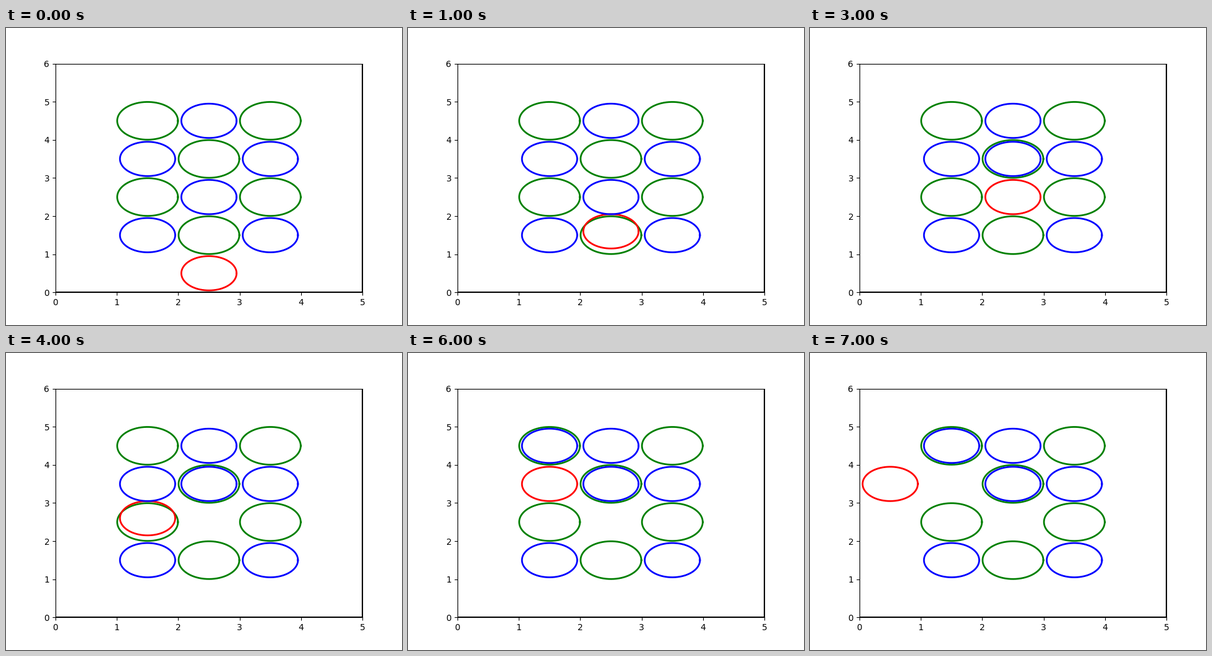
These frames come from a looping animation (640 by 480 pixels, 8 s). A matplotlib script:

```python
import numpy as np
import matplotlib.pyplot as plt
from matplotlib.animation import FuncAnimation

COLS, ROWS = 5, 6
GRAB = 0.1  # lean towards a held box
THETA = np.linspace(0, 2 * np.pi, 150)

# One entry per second: player cell and whether it holds the box above.
STEPS = [
    ((2, 0), False),
    ((2, 1), True),
    ((2, 2), True),
    ((2, 2), False),
    ((1, 2), True),
    ((1, 3), True),
    ((1, 3), False),
    ((0, 3), False),
]

CELLS = [(x, y) for y in range(1, 5) for x in range(1, 4)]
GOALS = [c for c in CELLS if sum(c) % 2]
BOXES = [c for c in CELLS if sum(c) % 2 == 0]

fig, ax = plt.subplots(figsize=(6.4, 4.8), dpi=100)
ax.set_xlim(0, COLS)
ax.set_ylim(0, ROWS)

for x in (0, COLS):
    ax.plot([x, x], [0, ROWS], color="black", lw=1.5)
for y in (0, ROWS):
    ax.plot([0, COLS], [y, y], color="black", lw=1.5)


def ring(cell, radius, lift=0.0):
    x, y = cell
    return (x + 0.5 + radius * np.cos(THETA),
            y + 0.5 + lift + radius * np.sin(THETA))


def add_ring(cell, radius, color):
    return ax.plot(*ring(cell, radius), color=color, lw=2)[0]


for goal in GOALS:
    add_ring(goal, 0.495, "green")
player = add_ring(STEPS[0][0], 0.45, "red")
boxes = [add_ring(box, 0.45, "blue") for box in BOXES]


def boxes_at(step):
    """Replay the pushes: a held box moves with the player."""
    cells = list(BOXES)
    for (before, held), (after, _) in zip(STEPS[:step], STEPS[1:step + 1]):
        if held:
            above = (before[0], before[1] + 1)
            cells[cells.index(above)] = (after[0], after[1] + 1)
    return cells


def draw(step):
    cell, held = STEPS[step]
    player.set_data(*ring(cell, 0.45, GRAB if held else 0.0))
    for line, box in zip(boxes, boxes_at(step)):
        line.set_data(*ring(box, 0.45))
    return [player, *boxes]


anim = FuncAnimation(fig, draw, frames=len(STEPS), interval=1000,
                     repeat=True, repeat_delay=0)
plt.show()
```
